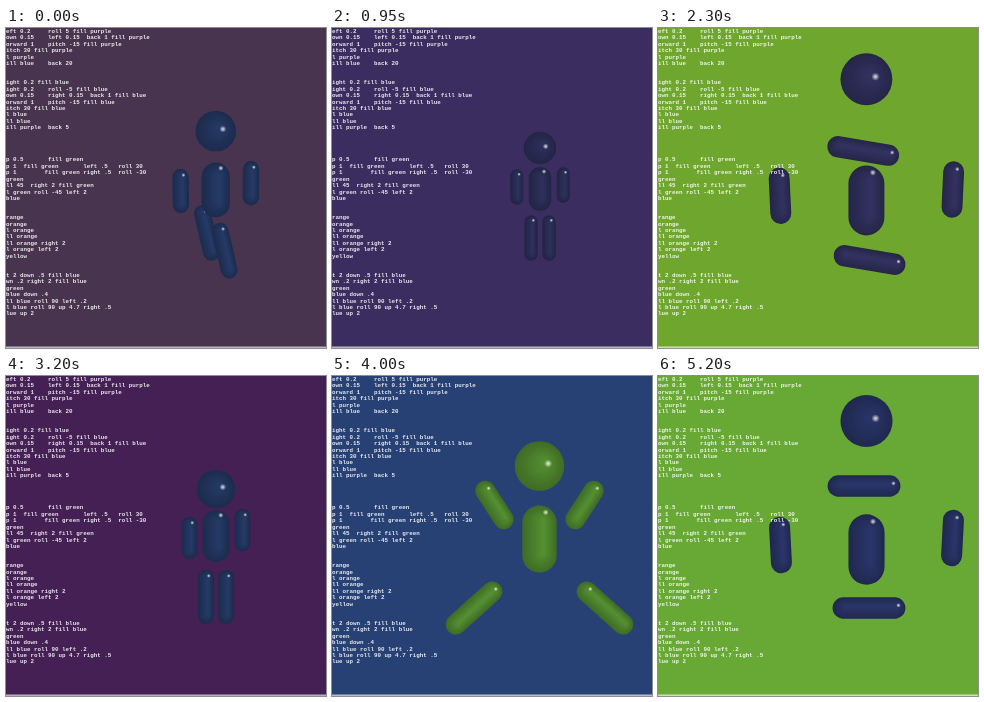
An HTML page with a canvas for the animation above (5.25 s loop, 320 by 320 pixels).

```html
<!DOCTYPE html>
<html>
<head>
<meta charset="utf-8">
<style>
html, body { margin: 0; width: 100%; height: 100%; overflow: hidden; background: #442052; }
canvas { display: block; width: 100vw; height: 100vh; }
</style>
</head>
<body>
<canvas width="320" height="320"></canvas>
<script>
const ctx = document.querySelector('canvas').getContext('2d');
const LOOP = 5250, STEP = 50;

// Limbs mirror about x; tip raises the right arm, lift the left leg, spin turns both legs
const base = {
  x: 207.5, size: 1, headY: 90, torsoY: 163, tip: 0, lift: 0, spin: 0,
  armX: 45, armY: 129, armTurn: 0, legX: 0, legY: 232, legTurn: 0
};
const star = { ...base, bg: [39, 65, 117], body: [80, 136, 47], armTurn: -33, legX: 65.5, legTurn: 48 };
const drop = {
  ...base, bg: [172, 153, 0], body: [110, 20, 20],
  headY: 104, armX: 90, armY: 157, legX: 9
};
const bars = {
  ...base, bg: [104, 168, 52], body: [40, 51, 100], x: 208.5, size: 1.05, headY: 45, torsoY: 173.5,
  armX: 86, armY: 165.5, armTurn: -3, tip: 3.5, legX: 2.5, lift: 122, spin: -90
};
const sway = {
  ...base, bg: [68, 32, 84], body: [35, 56, 97], x: 210, size: 0.78, headY: 113, torsoY: 160,
  armX: 26.5, armY: 158, tip: 4, legX: 10, legY: 221
};
const small = {
  ...sway, bg: [52, 58, 110], body: [52, 38, 78], x: 206, size: 0.53, headY: 127, torsoY: 162,
  armX: 20, tip: -2, legX: 8, legY: 199
};

const keys = [
  [-304, bars], [96, sway], [420, small], [740, sway], [1160, small],
  [1590, star], [1945, drop], [2390, bars], [2790, small], [3190, sway],
  [3590, small], [3990, star], [4590, drop], [5190, bars], [5300, bars]
];

// Text column cut off by the left edge
const script = `eft 0.2     roll 5 fill purple
own 0.15    left 0.15  back 1 fill purple
orward 1    pitch -15 fill purple
itch 30 fill purple
l purple
ill blue    back 20


ight 0.2 fill blue
ight 0.2    roll -5 fill blue
own 0.15    right 0.15  back 1 fill blue
orward 1    pitch -15 fill blue
itch 30 fill blue
l blue
ll blue
ill purple  back 5




p 0.5       fill green
p 1  fill green       left .5   roll 30
p 1        fill green right .5  roll -30
green
ll 45  right 2 fill green
l green roll -45 left 2
blue


range
orange
l orange
ll orange
ll orange right 2
l orange left 2
yellow


t 2 down .5 fill blue
wn .2 right 2 fill blue
green
blue down .4
ll blue roll 90 left .2
l blue roll 90 up 4.7 right .5
lue up 2`.split('\n');

const rgb = (c, k = 1) => `rgb(${c.map(v => Math.min(255, v * k)).join()})`;
const mix = (a, b, e) => Array.isArray(a) ? a.map((v, i) => mix(v, b[i], e)) : a + (b - a) * e;

function poseAt(t) {
  const i = keys.findIndex(k => k[0] > t);
  const [t0, a] = keys[i - 1], [t1, b] = keys[i];
  const u = (t - t0) / (t1 - t0), e = u * u * (3 - 2 * u);
  return Object.fromEntries(Object.keys(a).map(k => [k, mix(a[k], b[k], e)]));
}

// Rounded rod, shaded by nested strokes that drift toward the light
function capsule(color, x, y, half, turn, r, lightX = 0.35, lightY = -0.25) {
  const a = turn * Math.PI / 180;
  const dx = half * Math.sin(a), dy = -half * Math.cos(a);
  const rod = (ox, oy, width, style) => {
    ctx.strokeStyle = style;
    ctx.lineWidth = width;
    ctx.beginPath();
    ctx.moveTo(x + dx + ox, y + dy + oy);
    ctx.lineTo(x - dx + ox + 0.01, y - dy + oy);
    ctx.stroke();
  };
  ctx.lineCap = 'round';
  for (let s = 0; s < 1; s += 0.1)
    rod(r * s * 0.25, -r * s * 0.15, 2 * r * (1 - s), rgb(color, 0.8 + 0.28 * s));

  const end = turn < -60 ? -1 : 1;
  const hx = x + dx * end + r * lightX, hy = y + dy * end + r * lightY, hr = 1 + r * 0.12;
  const glow = ctx.createRadialGradient(hx, hy, 0, hx, hy, hr);
  glow.addColorStop(0, 'rgba(255,255,255,.85)');
  glow.addColorStop(1, 'rgba(255,255,255,0)');
  ctx.fillStyle = glow;
  ctx.fillRect(hx - hr, hy - hr, 2 * hr, 2 * hr);
}

function drawFigure(p) {
  const { x, size, body } = p;
  for (const side of [-1, 1])
    capsule(body, x + side * p.legX, p.legY - (side < 0 ? p.lift : 0),
      24.5 * size, p.spin - side * p.legTurn, 10.2 * size);
  for (const side of [-1, 1])
    capsule(body, x + side * p.armX, p.armY - side * p.tip,
      17 * size, -side * p.armTurn, 10 * size);
  capsule(body, x, p.torsoY, 16.3 * size, 0, 17.2 * size, 0.36, -0.6);
  capsule(body, x, p.headY, 0, 0, 24.8 * size, 0.35, -0.1);
}

function draw(t) {
  const p = poseAt(t);
  ctx.fillStyle = rgb(p.bg);
  ctx.fillRect(0, 0, 320, 320);
  ctx.fillStyle = 'rgba(255,255,255,.65)';
  ctx.fillRect(0, 318.5, 320, 1.5);
  drawFigure(p);
  ctx.font = 'bold 5.85px "Liberation Mono", monospace';
  ctx.fillStyle = 'rgba(255,255,255,.88)';
  script.forEach((line, row) => ctx.fillText(line, 0, 5 + row * 6.42));
}

const start = performance.now();
function frame() {
  const t = (performance.now() - start) % LOOP;
  draw(Math.floor(t / STEP) * STEP);
  requestAnimationFrame(frame);
}
frame();
</script>
</body>
</html>
```
